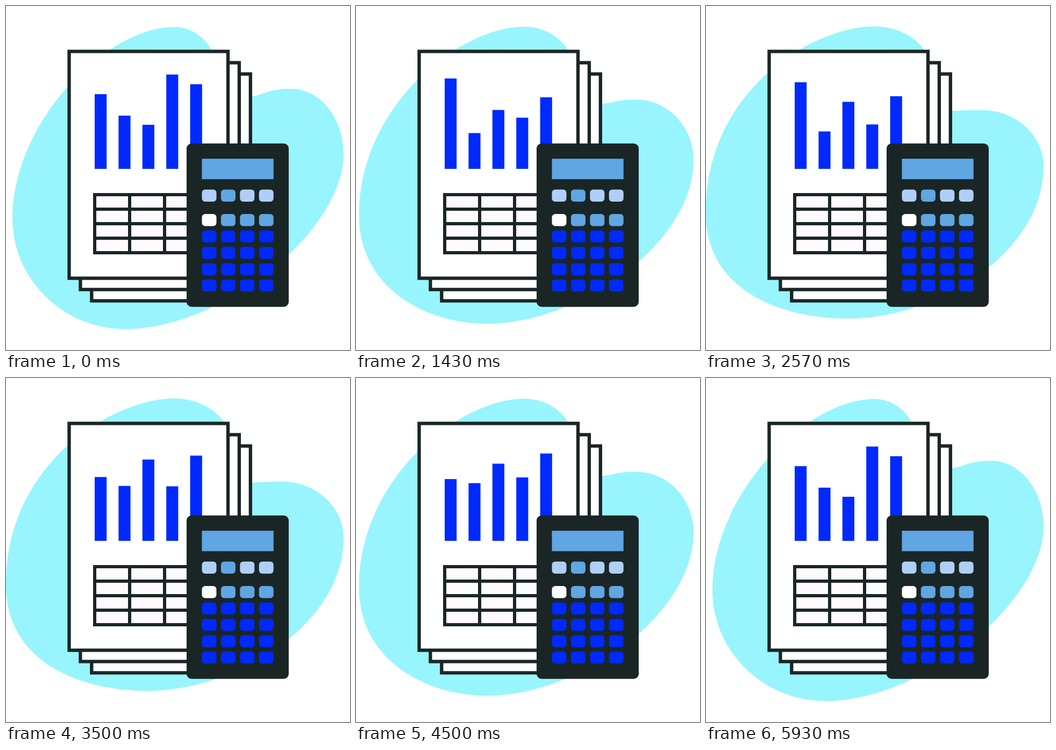
An HTML page for the animation above (6000 ms loop, 640 by 640 pixels).

```html
<!DOCTYPE html>
<html lang="en">
<head>
<meta charset="utf-8">
<title>Report and calculator</title>
<style>
  html, body { margin: 0; width: 100%; height: 100%; overflow: hidden; background: #fff; }
  svg { display: block; width: 100%; height: 100%; }
</style>
</head>
<body>
<svg viewBox="0 0 640 640">
  <path id="blob" fill="#98f5fd"/>
  <g fill="#fff" stroke="#1a2625" stroke-width="6.3">
    <g id="sheets"></g>
    <path fill="#fefbff" stroke-width="6" d="M165 351H360V459H165ZM165 378H360M165 405H360M165 432H360M230 351V461M295 351V461"/>
  </g>
  <g id="bars" fill="#0029ff"></g>
  <rect x="336" y="255.7" width="190" height="304" rx="9.5" fill="#1a2625"/>
  <rect x="364.5" y="284.2" width="133.2" height="38" fill="#60a6e2"/>
  <g id="keys"></g>
</svg>
<script>
const $ = id => document.getElementById(id);
const LOOP = 6000;
const MID = '#60a6e2', LIGHT = '#b0cff8', BLUE = '#0029ff';

const clamp = u => Math.min(1, Math.max(0, u));
const mix = (a, b, u) => a + (b - a) * u;
const smooth = u => u * u * (3 - 2 * u);
const wave = u => (1 - Math.cos(Math.PI * clamp(u))) / 2;
const rect = (x, y, w, h, rest = '') =>
  `<rect x="${x}" y="${y}" width="${w}" height="${h}" ${rest}/>`;

// Blob nodes: x, y, then how far the next curve's two handles reach.
// Every node has a vertical or a horizontal tangent.
const node = (x, y, out = .55, into = .55) => [x, y, out, into];
const tangents = 'vhvhhvh';
const tall = [
  node(12, 395, .506, .415), node(313, 39), node(391.5, 120), node(430, 170),
  node(531, 154), node(628, 275, .445, .438), node(222, 601)
];
const wide = [
  node(-1, 383, .66, .36), node(313, 38), node(419, 120), node(440, 196),
  node(513, 195), node(628, 299, .57, .455), node(265, 581, .41, .79)
];

function handle(p, q, reach, tangent) {
  return tangent === 'h' ? [mix(p[0], q[0], reach), p[1]] : [p[0], mix(p[1], q[1], reach)];
}

function blobPath(t) {
  const u = wave(t / 2880) - wave((t - 3060) / 2880);
  const nodes = tall.map((n, i) => n.map((v, j) => mix(v, wide[i][j], u)));
  const curves = nodes.map((p, i) => {
    const j = (i + 1) % nodes.length, q = nodes[j];
    const [, , out, into] = p;
    return 'C' + [handle(p, q, out, tangents[i]), handle(q, p, into, tangents[j]), q.slice(0, 2)];
  });
  return 'M' + nodes[0].slice(0, 2) + curves.join('');
}

// Top edge of each bar in three poses, visited in turn at equal intervals.
const tops = [
  [164, 128, 193.3], [204, 244, 193.8], [221, 187, 146],
  [127.5, 226.5, 197.5], [145.5, 175.5, 139.4]
];

function barShapes(t) {
  const step = Math.min(t / 1983, 2.9999), i = Math.floor(step);
  return tops.map((top, n) => {
    const y = mix(top[i], top[(i + 1) % 3], smooth(step - i));
    return rect(165 + n * 44.4, y, 22.2, 303 - y);
  }).join('');
}

$('sheets').innerHTML = [2, 1, 0].map(n => rect(117.5 + n * 20.9, 84.5 + n * 21, 295.5, 422)).join('');

const keyRows = [[LIGHT, MID, LIGHT, LIGHT], ['#fff', MID, MID, MID], ...Array(4).fill(Array(4).fill(BLUE))];
$('keys').innerHTML = keyRows.map((row, r) => row.map((color, c) =>
  rect(364.5 + c * 35.4, r ? 356.6 + r * 30.45 : 341.5, 27, 22.5, `rx="6" fill="${color}"`)
).join('')).join('');

const start = performance.now();
function draw() {
  const t = (performance.now() - start) % LOOP;
  $('blob').setAttribute('d', blobPath(t));
  $('bars').innerHTML = barShapes(t);
  requestAnimationFrame(draw);
}
draw();
</script>
</body>
</html>
```
